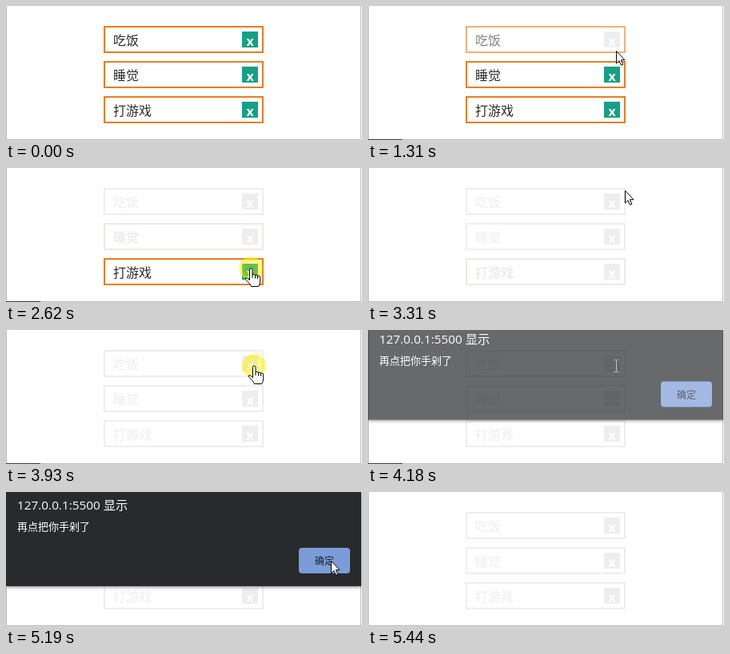
Write an HTML page that moves like this. It is 445 px wide and 168 px high and loops after 5.9 s.

```html
<!DOCTYPE html>
<html lang="zh-CN">
<head>
<meta charset="utf-8">
<title>待办列表</title>
<style>
html, body { margin: 0; width: 100%; height: 100%; overflow: hidden; background: #fff; }
#stage { position: relative; width: 445px; height: 168px; overflow: hidden; background: #fff;
  font-family: "Open Sans", "Noto Sans CJK SC", "Noto Sans CJK", sans-serif; }
#stage > *, .item b, .dialog > * { position: absolute; }
.frame { inset: 0 1px 0 0; border: 1px solid #bdbdbd; border-top: 0; }
.item { left: 122px; box-sizing: border-box; width: 200px; height: 34px; padding-left: 10px;
  border: 2px solid; font: 16px/30px "Noto Sans CJK SC", "Noto Sans CJK", sans-serif; }
.item b { left: 171px; top: 5px; width: 20px; height: 20px; color: #fff; text-align: center;
  font: 700 16px/24px "Open Sans", sans-serif; }
.status { left: 0; top: 167px; width: 43px; height: 1px; background: #3a3a3c; }
.dialog { left: 0; top: 0; width: 444px; height: 118px; background: #292a2d; color: #fff;
  box-shadow: 0 -20px 0 #292a2d, 0 1px 4px rgba(0, 0, 0, .55); white-space: nowrap; }
.host { left: 14px; top: 5px; font-size: 15.3px; font-weight: 500; line-height: 22px; }
.message { left: 14px; top: 33px; font-size: 13px; line-height: 20px; }
.ok { left: 366px; top: 70px; width: 64px; height: 32px; border-radius: 4px; background: #7b9cd9;
  color: #202124; font-size: 12px; line-height: 34px; text-align: center; }
svg { left: 0; top: 0; }
</style>
</head>
<body>
<div id="stage">
  <div class="frame"></div>
  <div class="item" style="top:25px">吃饭<b>x</b></div>
  <div class="item" style="top:69px">睡觉<b>x</b></div>
  <div class="item" style="top:113px">打游戏<b>x</b></div>
  <div class="status"></div>
  <div class="dialog">
    <div class="host">127.0.0.1:5500 显示</div>
    <div class="message">再点把你手剁了</div>
    <div class="ok">确定</div>
  </div>
  <svg width="445" height="168">
    <defs>
      <radialGradient id="glow">
        <stop offset="0" stop-color="#e8ee00" stop-opacity=".32"/>
        <stop offset=".6" stop-color="#f2ee00" stop-opacity=".42"/>
        <stop offset=".85" stop-color="#fff200" stop-opacity=".62"/>
        <stop offset="1" stop-color="#fff200" stop-opacity=".4"/>
      </radialGradient>
    </defs>
    <g id="pointer">
      <circle id="halo" r="15" fill="url(#glow)"/>
      <g fill="#fff" stroke="#000" stroke-linejoin="round">
        <path id="arrow" d="M.5 .5V16L4 12.7L6.5 18.3L8.8 17.3L6.4 11.7H11Z"/>
        <path id="hand" d="M-1.5 14.5V1.5Q-1.5 0 .2 0T2 1.5V8.5Q2 7.3 3.7 7.3T5.5 9Q5.5 8 7 8T8.6 10Q9 9.2 10.3 9.2T11.7 11V16Q11.7 19 9.8 22.5H.5Q-1 18.5-5 15.5Q-7.5 13-6.5 12T-1.5 14.5ZM2 8.5V12M5.5 9V12.5M8.6 10V13"/>
        <path id="beam" d="M-2.5-7.5H-.5L.5-7L1.5-7.5H3.5M.5-7V7M-2.5 7.5H-.5L.5 7L1.5 7.5H3.5" fill="none" stroke="#c4c4c4"/>
      </g>
    </g>
  </svg>
</div>
<script>
const LOOP = 5900, FADE = 850;
const $ = s => document.querySelector(s);
const items = [...document.querySelectorAll('.item')];

const stop = (x, y, arrive, leave = arrive) => ({ x, y, arrive, leave });
const press = (x, y, arrive, at) => ({ ...stop(x, y, arrive, at + 30), at });

// One press per item, then one more that opens the dialog
const presses = [press(310, 46, 920, 1080), press(311, 82, 1700, 2000),
  press(306, 126, 2400, 2690), press(310, 45, 3550, 4040)];
const stops = [stop(232, 128, 150), stop(289, 44, 290, 460), ...presses.slice(0, 3),
  stop(321, 28, 3310), presses[3], stop(310, 45, 4130, 4720), stop(406, 86, 5190, LOOP)];

const ramp = (t, start, length) => Math.min(1, Math.max(0, (t - start) / length));
const smooth = p => p * p * (3 - 2 * p);

function pointerAt(t) {
  const i = Math.max(1, stops.findIndex(s => t < s.arrive));
  const last = t >= stops.at(-1).arrive;
  const a = stops[last ? stops.length - 2 : i - 1], b = last ? stops.at(-1) : stops[i];
  const p = smooth(ramp(t, a.leave, b.arrive - a.leave));
  return [a.x + (b.x - a.x) * p, a.y + (b.y - a.y) * p].map(Math.round);
}

// cubic-bezier(.25, .1, .25, 1)
function ease(p) {
  const curve = (u, a, b) => 3 * a * u * (1 - u) ** 2 + 3 * b * u * u * (1 - u) + u ** 3;
  let lo = 0, hi = 1;
  for (let i = 0; i < 16; i++) {
    const mid = (lo + hi) / 2;
    if (curve(mid, .25, .25) < p) lo = mid; else hi = mid;
  }
  return curve(hi, .1, 1);
}

const toGrey = (rgb, p) => `rgb(${rgb.map(v => Math.round(v + (238 - v) * p))})`;

const overButton = (x, y) => x >= 295 && x < 315 &&
  items.some((_, i) => y >= 32 + 44 * i && y < 52 + 44 * i);

function shapeAt(x, y, open) {
  if (open > .6) return y < 53 ? 'beam' : 'arrow';
  return overButton(x, y) ? 'hand' : 'arrow';
}

function draw(t) {
  items.forEach((item, i) => {
    const p = ease(ramp(t, presses[i].at, FADE));
    item.style.borderColor = toGrey([230, 126, 34], p);
    item.style.color = toGrey([44, 44, 44], p);
    item.lastChild.style.background = t >= presses[i].at ? '#eee' : '#16a085';
  });

  // The link bubble lags behind hovering
  $('.status').style.opacity = Math.max(...presses.map(s =>
    ramp(t, s.arrive + 80, 120) * (1 - ramp(t, s.leave + 350, 150))));

  const open = ramp(t, 4020, 230) * (1 - ramp(t, 5200, 220));
  $('.dialog').style.opacity = open;
  $('.dialog').style.transform = `translateY(${-18 * (1 - ramp(t, 4020, 230))}px)`;

  const [x, y] = pointerAt(t), shape = shapeAt(x, y, open);
  $('#pointer').style.display = t >= 150 && t < 5360 ? '' : 'none';
  $('#pointer').setAttribute('transform', `translate(${x} ${y})`);
  for (const id of ['arrow', 'hand', 'beam']) $('#' + id).style.display = id === shape ? '' : 'none';
  $('#halo').style.display = presses.some(s => Math.abs(t - s.at) < 110) ? '' : 'none';
}

const start = performance.now();
function loop() {
  draw((performance.now() - start) % LOOP);
  requestAnimationFrame(loop);
}
loop();
</script>
</body>
</html>
```
